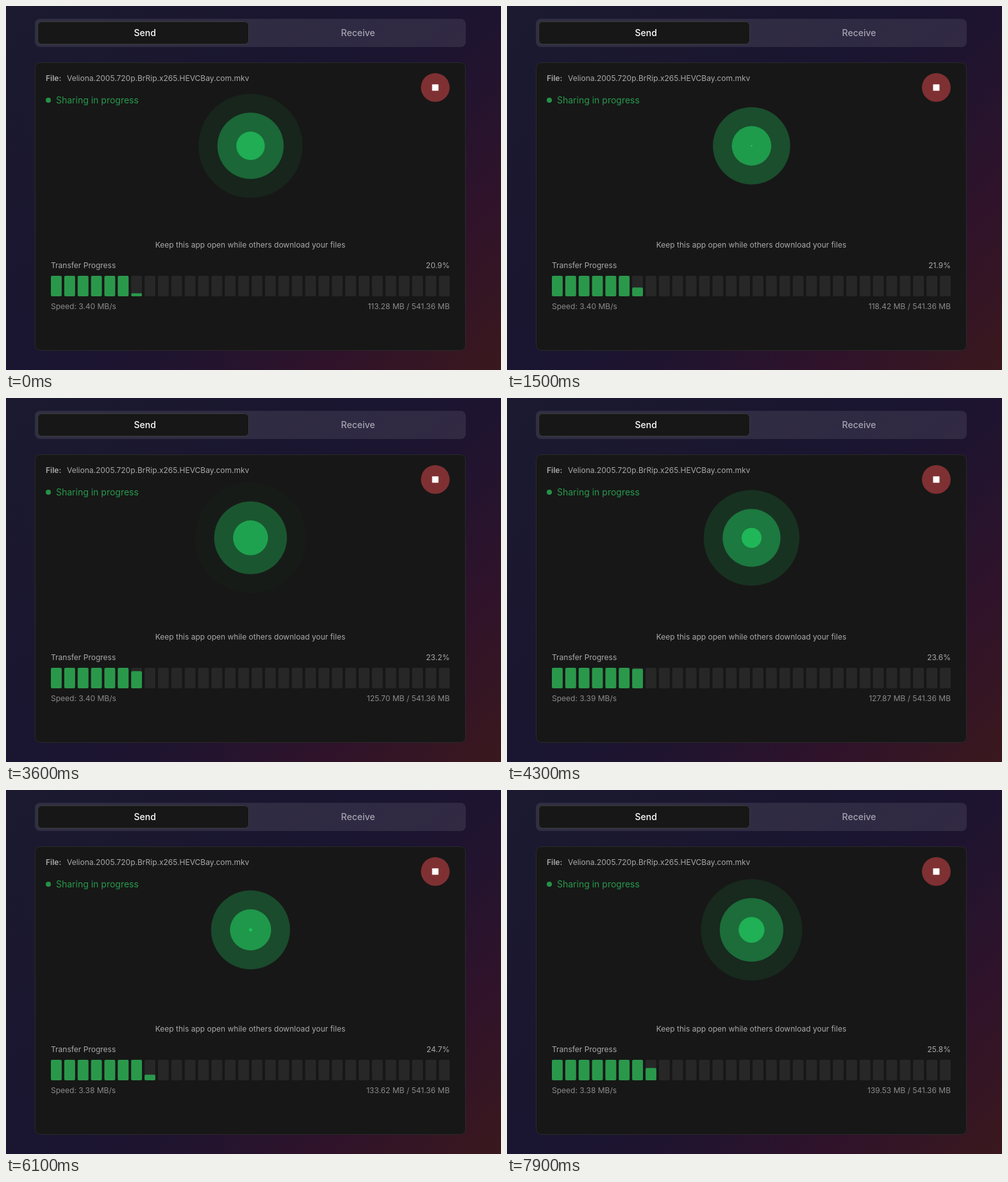
Write an HTML page that moves like this. It is 772x568 px and loops after 8 s.

```html
<!DOCTYPE html>
<html lang="en">
<head>
<meta charset="utf-8">
<title>File transfer</title>
<style>
  html, body { margin: 0; width: 100%; height: 100%; overflow: hidden; }
  body { background: linear-gradient(135deg, #1b1a2f, #1a1530 45%, #1e1430 58%, #30132a 80%, #3a181d); }
  svg { display: block; width: 772px; height: 568px; font: 12px Inter, "Open Sans", sans-serif; }
  .tab { font-size: 14px; font-weight: 500; text-anchor: middle; }
  .light { fill: #a9a9a9; }
  .dim { fill: #8b8b8b; }
  .right { text-anchor: end; }
</style>
</head>
<body>
<svg viewBox="0 0 772 568">
  <rect x="45" y="20" width="672" height="44" rx="8" fill="#fff" fill-opacity=".09"/>
  <rect x="49.5" y="24.5" width="329" height="35" rx="6" fill="#171717" stroke="#3c3c3a"/>
  <text class="tab" x="216.7" y="47" fill="#fff">Send</text>
  <text class="tab" x="549" y="47" fill="#a6a3b0">Receive</text>

  <rect x="45.5" y="88.5" width="671" height="449" rx="8" fill="#171717" stroke="#2a2a2a"/>
  <text class="light" x="62" y="117" font-weight="600">File:</text>
  <text class="light" x="95" y="117">Veliona.2005.720p.BrRip.x265.HEVCBay.com.mkv</text>

  <g id="ripples" fill="#22c55e" stroke="#22c55e" stroke-opacity=".25"></g>

  <circle cx="66" cy="147" r="4" fill="#259148"/>
  <text x="78" y="152" font-size="14" fill="#289a4c">Sharing in progress</text>

  <circle cx="669.5" cy="127.2" r="22.4" fill="#7f3032"/>
  <rect x="664.5" y="122.2" width="10" height="10" rx=".5" fill="#fff"/>

  <text class="light" x="381" y="377" text-anchor="middle">Keep this app open while others download your files</text>
  <text class="light" x="70" y="409">Transfer Progress</text>
  <text class="light right" id="percent" x="692" y="409"></text>
  <g id="bars"></g>
  <text class="dim" id="speed" x="70" y="473"></text>
  <text class="dim right" id="amount" x="692" y="473"></text>
</svg>
<script>
const LOOP = 8000, STEP = 100;
const TOTAL_MB = 541.36;
const BARS = 30, BAR_TOP = 421, BAR_HEIGHT = 32, BAR_GAP = 4;
const BAR_PITCH = (622 + BAR_GAP) / BARS;
const BAR_LAG = 0.13;
const RINGS = 3, RING_GAP = 29.5, RING_MAX = RINGS * RING_GAP;

// Checkpoints: time in ms, megabytes sent, distance travelled by the ripple
const checkpoints = [
  [0, 113.28, 22.6],
  [1500, 118.42, 60.7],
  [2600, 122.36, 89.5],
  [3600, 125.70, 116.1],
  [5100, 130.36, 154.4],
  [7000, 136.56, 203],
  [7900, 139.53, 227]
];

const byId = id => document.getElementById(id);
const clamp01 = v => Math.min(1, Math.max(0, v));

function add(parent, name, attrs) {
  const el = document.createElementNS("http://www.w3.org/2000/svg", name);
  setAttrs(el, attrs);
  return parent.appendChild(el);
}

function setAttrs(el, attrs) {
  for (const key in attrs) el.setAttribute(key, attrs[key]);
}

function valueAt(t, column) {
  const next = Math.max(1, checkpoints.findIndex(c => c[0] >= t));
  const a = checkpoints[next - 1], b = checkpoints[next];
  return a[column] + (b[column] - a[column]) * (t - a[0]) / (b[0] - a[0]);
}

const rings = Array.from({ length: RINGS }, () =>
  add(byId("ripples"), "circle", { cx: 381.4, cy: 218.2 }));

const fills = Array.from({ length: BARS }, (_, i) => {
  const box = { x: 70 + i * BAR_PITCH, width: BAR_PITCH - BAR_GAP, rx: 2 };
  add(byId("bars"), "rect", { ...box, y: BAR_TOP, height: BAR_HEIGHT, fill: "#272727" });
  return add(byId("bars"), "rect", { ...box, fill: "#2a984b" });
});

function render(t) {
  const sent = valueAt(t, 1);
  const inner = valueAt(t, 2) % RING_GAP;

  // The widest ring is painted first
  rings.forEach((ring, i) => {
    const radius = inner + (RINGS - 1 - i) * RING_GAP;
    setAttrs(ring, { r: Math.max(0, radius - 0.5), opacity: clamp01(1 - radius / RING_MAX) });
  });

  const filled = sent / TOTAL_MB * BARS - BAR_LAG;
  fills.forEach((bar, i) => {
    const height = BAR_HEIGHT * clamp01(filled - i);
    setAttrs(bar, { y: BAR_TOP + BAR_HEIGHT - height, height });
  });

  const speed = t < 4000 ? "3.40" : t < 5900 ? "3.39" : "3.38";
  byId("percent").textContent = (sent / TOTAL_MB * 100).toFixed(1) + "%";
  byId("speed").textContent = `Speed: ${speed} MB/s`;
  byId("amount").textContent = `${sent.toFixed(2)} MB / ${TOTAL_MB} MB`;
}

const start = performance.now();
function tick() {
  const elapsed = (performance.now() - start) % LOOP;
  render(Math.floor(elapsed / STEP) * STEP);
  requestAnimationFrame(tick);
}
tick();
</script>
</body>
</html>
```
